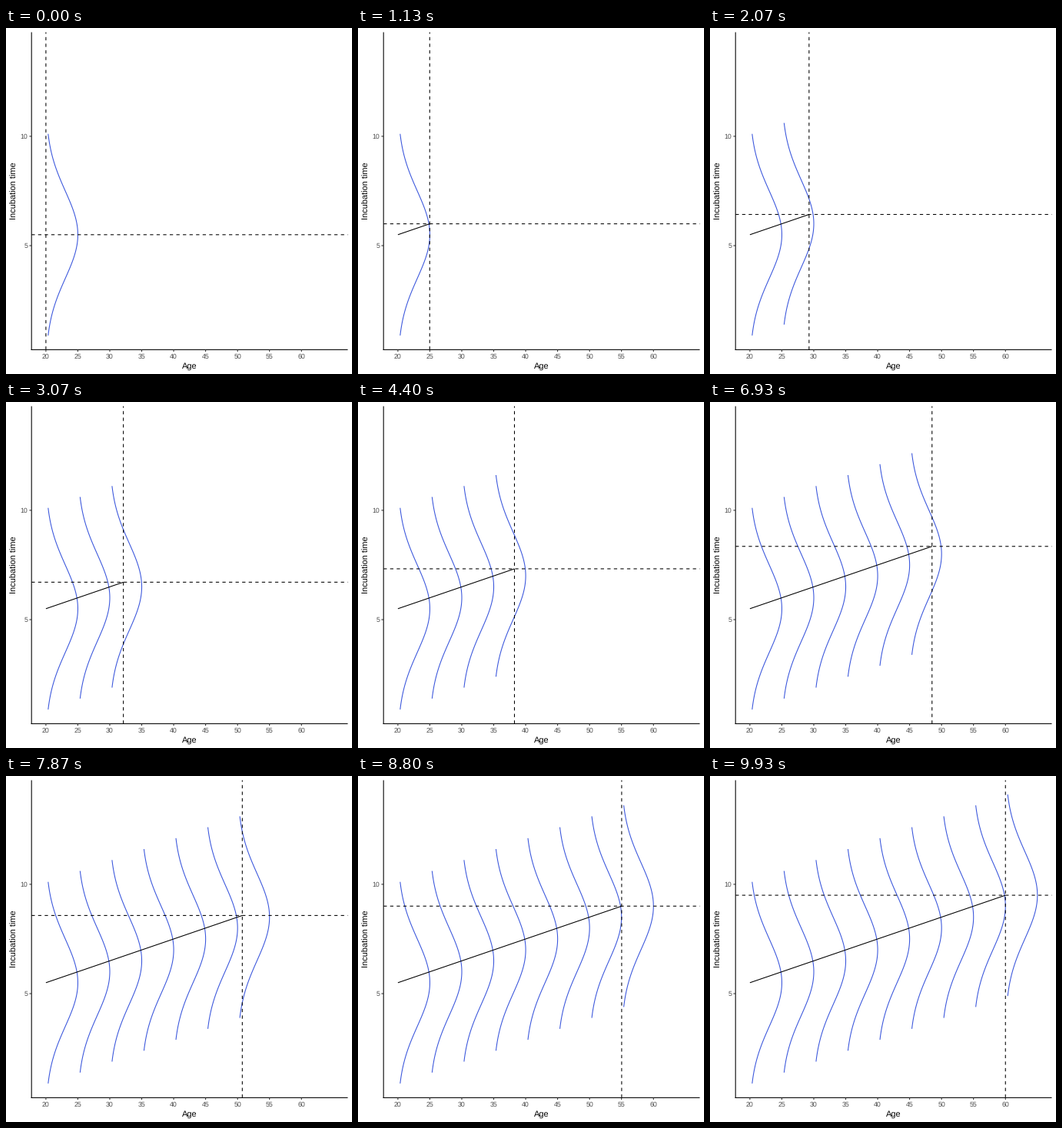
Recreate the animation shown at these times as a matplotlib script. Size 450 px wide and 450 px high, loop 10000 ms.

```python
import numpy as np
import matplotlib.pyplot as plt
from matplotlib.animation import FuncAnimation

plt.rcParams["font.family"] = "Liberation Sans"
plt.rcParams["text.hinting"] = "none"

SIZE = 450
LOOP_MS, TICK_MS, POSES = 10000, 20, 150
LEFT, RIGHT, TOP, BOTTOM = 33.2, 444.5, 5.5, 418.4
LW = 1.07
BLUE = "#3A56DC"
AGES = np.arange(20, 61, 5)
KNOTS = np.round(np.linspace(0, POSES - 1, len(AGES))).astype(int)


def px(age):
    return LEFT + (age - 17.75) * (RIGHT - LEFT) / 49.5


def py(time):
    return BOTTOM - (time - 0.24) * (BOTTOM - TOP) / 14.52


def mean_time(age):
    return 5.5 + 0.1 * (age - 20)


def ease(p):
    """Cubic in and out."""
    return 4 * p**3 if p < 0.5 else 1 - 4 * (1 - p) ** 3


def age_at(pose):
    i = min(np.searchsorted(KNOTS, pose, side="right") - 1, len(AGES) - 2)
    p = (pose - KNOTS[i]) / (KNOTS[i + 1] - KNOTS[i])
    return AGES[i] + 5 * ease(p)


fig = plt.figure(figsize=(SIZE / 72, SIZE / 72), dpi=72, facecolor="white")
ax = fig.add_axes([0, 0, 1, 1])
ax.set_xlim(0, SIZE)
ax.set_ylim(SIZE, 0)
ax.axis("off")


def stroke(x, y, color="black", **kw):
    line, = ax.plot(x, y, color=color, lw=LW, solid_capstyle="butt",
                    snap=False, **kw)
    return line


def label(x, y, text, size, color, **kw):
    ax.text(x, y, text, fontsize=size, color=color, **kw)


# Axes, ticks and titles
stroke([LEFT, LEFT], [BOTTOM + LW / 2, TOP])
stroke([LEFT - LW / 2, RIGHT], [BOTTOM, BOTTOM])
for age in AGES:
    stroke([px(age)] * 2, [BOTTOM, BOTTOM + 2.75], "#333333")
    label(px(age), 430, str(age), 8.8, "#4D4D4D", ha="center", va="baseline")
for time in (5, 10):
    stroke([LEFT - 2.75, LEFT], [py(time)] * 2, "#333333")
    label(28.3, py(time) + 3.2, str(time), 8.8, "#4D4D4D",
          ha="right", va="baseline")
label((LEFT + RIGHT) / 2, 443, "Age", 11, "black", ha="center", va="baseline")
label(13.4, (TOP + BOTTOM) / 2, "Incubation time", 11, "black", rotation=90,
      rotation_mode="anchor", ha="center", va="baseline")

# Sideways bell curve for each age
offset = np.linspace(-4.61, 4.61, 120)
bell = 5 * np.exp(-offset**2 / 8)
curves = [stroke(px(a + bell), py(mean_time(a) + offset), BLUE) for a in AGES]

trend = stroke([], [])
dashed = dict(ls=(0, (4, 4)), dash_capstyle="butt")
vline = stroke([], [], **dashed)
hline = stroke([], [], **dashed)


def draw(tick):
    pose = (tick * TICK_MS + 15) * POSES // LOOP_MS
    age = age_at(pose)
    x, y = px(age), py(mean_time(age))
    trend.set_data([px(20), x], [py(5.5), y])
    vline.set_data([x, x], [BOTTOM, TOP])
    hline.set_data([LEFT, RIGHT], [y, y])
    for curve, knot in zip(curves, KNOTS):
        curve.set_visible(bool(pose >= knot))
    return [trend, vline, hline, *curves]


anim = FuncAnimation(fig, draw, frames=LOOP_MS // TICK_MS, interval=TICK_MS,
                     repeat=True, repeat_delay=0)
plt.show()
```
